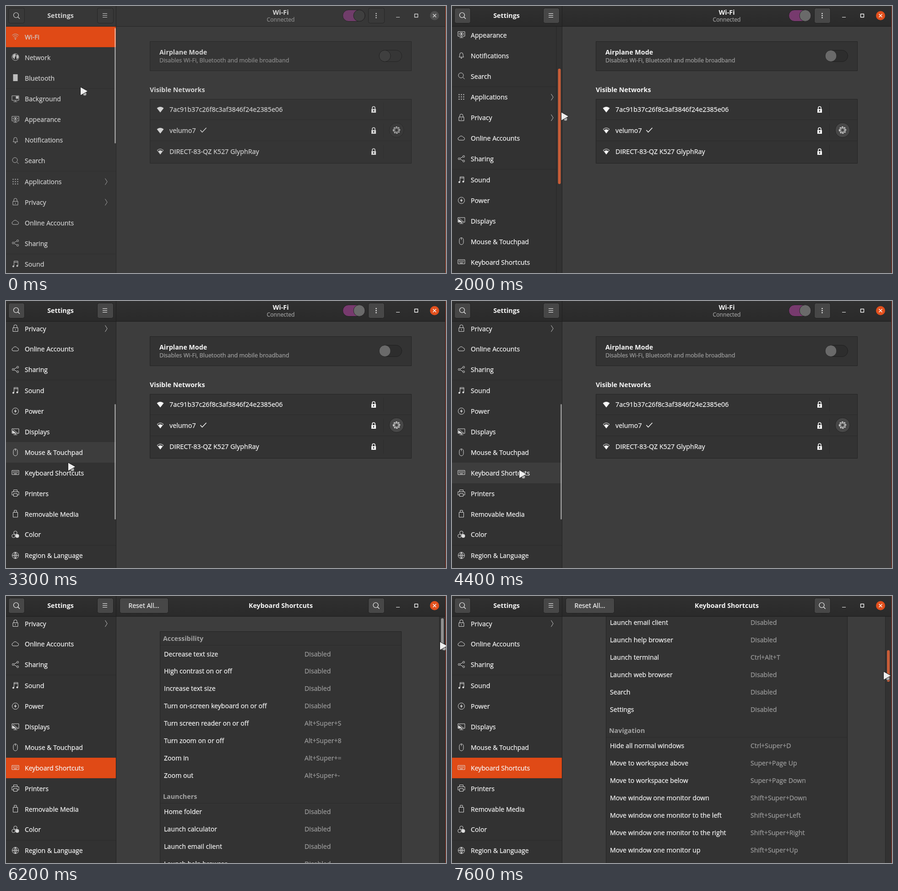
An HTML page with a canvas for the animation above (8000 ms loop, 961x583 px).

```html
<!DOCTYPE html>
<html lang="en">
<head>
<meta charset="utf-8">
<title>Settings</title>
<style>
html, body { margin: 0; width: 100%; height: 100%; overflow: hidden; background: #3c3c3c; }
canvas { display: block; }
</style>
</head>
<body>
<canvas id="stage" width="961" height="583"></canvas>
<script>
const ctx = document.getElementById('stage').getContext('2d');
const FONT = '"Open Sans", "Noto Sans", sans-serif';
const ORANGE = '#e04a16', SLIDER = '#c85d38', IDLE_SLIDER = 'rgba(255, 255, 255, .46)';

const circle = (x, y, r) => `M${x - r} ${y}a${r} ${r} 0 1 0 ${2 * r} 0a${r} ${r} 0 1 0 ${-2 * r} 0`;
const dots = [-5, 0, 5].flatMap(y => [-5, 0, 5].map(x => `M${x - 1} ${y - 1}h2v2h-2z`)).join('');

// label, stroked path, filled path
const ITEMS = [
  ['Wi-Fi', 'M-7-2.5Q0-8.5 7-2.5M-5 .5Q0-4 5 .5M-2.8 3.2Q0 .8 2.8 3.2', circle(0, 5.5, 1.3)],
  ['Network', circle(0, 0, 7.5), 'M-5-5L0-7 1-3-1 0-2 5-6 0zM2-5L6-4 7 1 3 5 2 0z'],
  ['Bluetooth', '', 'M-5-7.5H5V7.5H-5z'],
  ['Background', 'M-7.5-6.5H7.5V3.5H-7.5zM0 3.5V6.5M-4 6.5H4', 'M1-5.5H6.5V0H1z'],
  ['Appearance', 'M-7.5-6.5H7.5V3.5H-7.5zM0 3.5V6.5M-4 6.5H4M-5.5-1.5Q0-7 5.5-1.5Q0 4-5.5-1.5z', circle(0, -1.5, 1.8)],
  ['Notifications', 'M-5 4H5Q3.5 2.5 3.5-2A3.5 3.5 0 0 0-3.5-2Q-3.5 2.5-5 4z', 'M-1.5 5.5h3v1.5h-3z'],
  ['Search', circle(-1, -1, 5.5) + 'M3 3L7 7', ''],
  ['Applications', '', dots],
  ['Privacy', 'M-5.5-1H5.5V7H-5.5zM-3.5-1V-4A3.5 3.5 0 0 1 3.5-4V-1M0 2V4.5', ''],
  ['Online Accounts', 'M-4.5 4.5A3.2 3.2 0 0 1-5-1.8A5 5 0 0 1 4-2A3.3 3.3 0 0 1 4.5 4.5z', ''],
  ['Sharing', 'M-3-1L3-4M-3 1L3 4' + circle(-5, 0, 2) + circle(5, -5, 2) + circle(5, 5, 2), ''],
  ['Sound', 'M-3 5V-6.5H5.5V4M-3-4H5.5', circle(-4.5, 5, 2) + circle(4, 4, 2)],
  ['Power', circle(0, 0, 7), 'M1-5L-3 1H0L-1 5 3-1H0z'],
  ['Displays', 'M-7.5-6.5H7.5V3.5H-7.5zM0 3.5V6.5M-4 6.5H4M-5-5L5 3', 'M-6.5-3L2 3H-6.5z'],
  ['Mouse & Touchpad', 'M-4.5-3A4.5 4.5 0 0 1 4.5-3V3A4.5 4.5 0 0 1-4.5 3zM0-7.5V-3', ''],
  ['Keyboard Shortcuts', 'M-7.5-4.5H7.5V4.5H-7.5z', [-5, -2.2, .6, 3.4].map(x => `M${x}-2.5h1.5v1.5h-1.5zM${x} 0h1.5v1.2h-1.5z`).join('') + 'M-3 2.2H3V3.3H-3z'],
  ['Printers', 'M-4-3V-7H4V-3M-4 4H-7.5V-3H7.5V4H4M-4 1H4V7H-4z', ''],
  ['Removable Media', 'M-5-3H5V7.5H-5zM-2.5-3V-7.5H2.5V-3', ''],
  ['Color', circle(0, -3.5, 3.7) + circle(-4, 3.5, 3.7), circle(4, 3.5, 4)],
  ['Region & Language', circle(0, 0, 7) + 'M0-7Q-6 0 0 7Q6 0 0-7M-7 0H7M0-7V7', '']
];
const BREAKS = [3, 7, 11, 19];
const rowTop = i => 45 + 44.9 * i + .9 * BREAKS.filter(b => b <= i).length;

const off = names => names.map(n => [n, 'Disabled']);
const SECTIONS = [
  ['Accessibility', [
    ...off(['Decrease text size', 'High contrast on or off', 'Increase text size', 'Turn on-screen keyboard on or off']),
    ['Turn screen reader on or off', 'Alt+Super+S'], ['Turn zoom on or off', 'Alt+Super+8'],
    ['Zoom in', 'Alt+Super+='], ['Zoom out', 'Alt+Super+-']]],
  ['Launchers', [
    ...off(['Home folder', 'Launch calculator', 'Launch email client', 'Launch help browser']),
    ['Launch terminal', 'Ctrl+Alt+T'], ...off(['Launch web browser', 'Search', 'Settings'])]],
  ['Navigation', [
    ['Hide all normal windows', 'Ctrl+Super+D'], ['Move to workspace above', 'Super+Page Up'],
    ['Move to workspace below', 'Super+Page Down'], ['Move window one monitor down', 'Shift+Super+Down'],
    ['Move window one monitor to the left', 'Shift+Super+Left'],
    ['Move window one monitor to the right', 'Shift+Super+Right'],
    ['Move window one monitor up', 'Shift+Super+Up']]]
];

// time, cursor x, cursor y
const PATH = [
  [0, 162, 177], [100, 187, 161], [200, 212, 146], [500, 236, 139], [800, 235, 140], [900, 236, 139],
  [2600, 238, 318], [3300, 135, 353], [3400, 133, 360], [3500, 133, 364], [4400, 146, 369],
  [4800, 210, 362], [4900, 270, 340], [5100, 442, 237], [5600, 700, 180], [5700, 926, 123],
  [5900, 946, 144], [6100, 947, 120], [6200, 947, 100], [6600, 947, 119], [6800, 947, 138],
  [7000, 946, 148], [7300, 944, 157], [7400, 943, 161], [7600, 942, 165]
];
// time, cursor x, cursor y, sidebar scroll
const DRAG = [[1000, 236, 139, 0], [1500, 238, 185, 72], [2000, 238, 232, 184.4], [2600, 238, 318, 368.2]];
// time, page scroll
const PAGE = [[0, 0], [6600, 130], [6800, 279], [7000, 355], [7300, 420], [7400, 455], [7600, 489]];

const hold = (keys, t) => keys.filter(k => k[0] <= t).pop().slice(1);
function glide(keys, t) {
  const last = keys[keys.length - 1];
  if (t >= last[0]) return last.slice(1);
  const i = Math.max(1, keys.findIndex(k => k[0] > t));
  const a = keys[i - 1], b = keys[i];
  const p = Math.max(0, (t - a[0]) / (b[0] - a[0]));
  return a.map((v, n) => v + (b[n] - v) * p).slice(1);
}
function mix(a, b, p) {
  const part = (s, n) => parseInt(s.slice(1 + 2 * n, 3 + 2 * n), 16);
  return `rgb(${[0, 1, 2].map(n => Math.round(part(a, n) + (part(b, n) - part(a, n)) * p))})`;
}

let focus = 0;
const tone = (idle, active) => mix(idle, active, focus);

function rect(x, y, w, h, fill) {
  ctx.fillStyle = fill;
  ctx.fillRect(x, y, w, h);
}
function box(x, y, w, h, r, fill, line) {
  ctx.beginPath();
  ctx.roundRect(x + .5, y + .5, w - 1, h - 1, r);
  ctx.fillStyle = fill;
  ctx.fill();
  if (!line) return;
  ctx.lineWidth = 1;
  ctx.strokeStyle = line;
  ctx.stroke();
}
function disc(x, y, r, fill, line) {
  box(x - r, y - r, 2 * r, 2 * r, r, fill, line);
}
function text(s, x, mid, color, size = 14.15, weight = 400, align = 'left') {
  const y = Math.round(mid + size * .357);
  ctx.font = `${weight} ${size}px ${FONT}`;
  ctx.textAlign = align;
  ctx.fillStyle = ctx.strokeStyle = color;
  ctx.fillText(s, x, y);
  if (weight > 400) return;
  ctx.lineWidth = .25; // slightly sturdier strokes
  ctx.strokeText(s, x, y);
}
const bold = (s, x, mid, color, align) => text(s, x, mid, color, 14.3, 700, align);
function icon(x, y, color, stroke, fill, width = 1) {
  ctx.save();
  ctx.translate(x, y);
  ctx.strokeStyle = ctx.fillStyle = color;
  ctx.lineWidth = width;
  if (stroke) ctx.stroke(new Path2D(stroke));
  if (fill) ctx.fill(new Path2D(fill));
  ctx.restore();
}
function clip(x, y, w, h, draw) {
  ctx.save();
  ctx.beginPath();
  ctx.rect(x, y, w, h);
  ctx.clip();
  draw();
  ctx.restore();
}
function scrollbar(edge, top, length, wide, color) {
  if (wide) {
    rect(edge - 12, 45, 12, 538, tone('#353535', '#323232'));
    rect(edge - 13, 45, 1, 538, tone('#303030', '#272727'));
    box(edge - 9.5, top, 7, length, 3.5, color);
  } else {
    box(edge - 4, top, 4, length, 1.5, color);
  }
}

const ink = () => tone('#d2d2d2', '#f7f7f7');
const panel = () => tone('#353535', '#333333');
const border = () => tone('#292929', '#242424');

function button(x, w) {
  box(x, 4, w, 34, 4, tone('#393939', '#474747'), tone('#262626', '#202020'));
}
const searchIcon = x => icon(x, 21, ink(), circle(-1, -1, 5.5) + 'M3 3L7 7', '', 1.2);

function toggle(x, y, on) {
  box(x, y, 50, 26, 13, on ? tone('#703d6a', '#773a6e') : tone('#363636', '#2d2d2d'), tone('#252525', '#1f1f1f'));
  disc(on ? x + 36.5 : x + 12.5, y + 13, 13, tone('#3f3f3f', '#6a6a6a'), tone('#222222', '#2a2a2a'));
}

function header(onKeys) {
  const shade = ctx.createLinearGradient(0, 0, 0, 44);
  shade.addColorStop(0, tone('#373737', '#303030'));
  shade.addColorStop(1, tone('#373737', '#2a2a2a'));
  rect(0, 0, 961, 45, shade);
  rect(0, 44, 961, 1, tone('#262626', '#1c1c1c'));
  rect(240, 0, 1, 45, tone('#262626', '#1f1f1f'));
  button(5, 36);
  searchIcon(23);
  button(199, 36);
  icon(216, 21, ink(), 'M-5-4.5H5M-5-.5H5M-5 3.5H5');
  bold('Settings', 119, 21, ink(), 'center');
  button(791, 36);
  if (onKeys) {
    button(248, 107);
    text('Reset All…', 301, 21, ink(), 14.15, 400, 'center');
    bold('Keyboard Shortcuts', 600, 21, ink(), 'center');
    searchIcon(808.5);
  } else {
    bold('Wi-Fi', 600, 14, ink(), 'center');
    text('Connected', 600, 29.5, tone('#8c8c8c', '#a0a0a0'), 12.1, 400, 'center');
    toggle(735, 8, true);
    icon(808.5, 21, ink(), '', circle(0, -4.5, 1.3) + circle(0, 0, 1.3) + circle(0, 4.5, 1.3));
  }
  rect(852, 24, 8, 1, ink());
  icon(896, 21, ink(), 'M-3.5-3.5h7v7h-7z', '', 1.4);
  disc(936, 21, 10.5, tone('#505050', '#e2501d'));
  icon(936, 21, ink(), 'M-3.5-3.5L3.5 3.5M3.5-3.5L-3.5 3.5', '', 1.5);
}

function sidebar(t, scroll, cursor) {
  rect(0, 45, 240, 538, tone('#353535', '#323232'));
  const chosen = t < 4600 ? 0 : 15;
  const glow = t < 4600 ? 1 : t < 4800 ? .6 : t < 4900 ? .85 : 1;
  ITEMS.forEach(([label, stroke, fill], i) => {
    const y = rowTop(i) - scroll;
    if (y < 0 || y > 583) return;
    const hover = t >= 3300 && cursor[0] < 228 && cursor[1] >= y && cursor[1] < y + 45;
    if (BREAKS.includes(i)) rect(0, Math.round(y) - 1, 240, 1, tone('#2f2f2f', '#2b2b2b'));
    if (i === chosen) box(0, Math.round(y), 240, 45, 0, mix('#3d3d3d', ORANGE, glow), mix('#3d3d3d', '#cf4414', glow));
    else if (hover) rect(0, Math.round(y), 240, 45, '#3d3d3d');
    const mid = y + 22.4;
    icon(20.5, Math.round(mid) - .5, tone('#bdbdbd', '#dedede'), stroke, fill);
    text(label, 41, mid + .3, ink());
    if (i === 7 || i === 8) icon(219, mid, tone('#a8a8a8', '#c8c8c8'), 'M-2.5-7L2 0-2.5 7');
  });
  const dragged = t >= 1100 && t < 3300;
  if (t < 5100) scrollbar(240.5, 47.5 + scroll / 2.08, 253, t >= 500 && t < 3300, dragged ? SLIDER : IDLE_SLIDER);
  rect(240, 45, 1, 538, tone('#282828', '#222222'));
}

function wifiPage(t) {
  box(314, 77, 572, 65, 0, panel(), border());
  bold('Airplane Mode', 335, 100.5, ink());
  text('Disables Wi-Fi, Bluetooth and mobile broadband', 335, 119, tone('#8c8c8c', '#a0a0a0'), 12.6);
  toggle(815, 96, false);
  bold('Visible Networks', 314, 182.5, ink());
  box(314, 203, 572, 141, 0, panel(), border());
  ['7ac91b37c26f8c3af3846f24e2385e06', 'velumo7', 'DIRECT-83-QZ K527 GlyphRay'].forEach((name, i) => {
    const y = 226 + 46 * i;
    const weak = i === 2 || (i === 1 && t >= 500);
    if (i) rect(315, y - 24, 570, 1, tone('#2e2e2e', '#2a2a2a'));
    icon(337, y, ink(), weak ? 'M-6.8-3Q0-8.5 6.8-3L0 5.5z' : '', weak ? 'M-4.5-1Q0-4.5 4.5-1L0 6z' : 'M-7.5-3Q0-9 7.5-3L0 6.5z');
    text(name, 357, y, ink(), 14.3);
    icon(803, y, ink(), 'M-3-1V-3.5A3 3 0 0 1 3-3.5V-1', 'M-5-1H5V7H-5zM-1 1V4.5H1V1z', 1.6);
    rect(824, y - 15, 1, 30, tone('#303030', '#2c2c2c'));
  });
  icon(431, 271, ink(), 'M-6.5 0L-2.5 4.5 6.5-5', '', 1.5);
  disc(853, 271, 16.5, tone('#393939', '#474747'), tone('#2b2b2b', '#252525'));
  icon(853, 271, ink(), circle(0, 0, 6.2) + circle(0, 0, 4.2));
  ctx.setLineDash([2.6, 2.9]);
  icon(853, 271, ink(), circle(0, 0, 7.3), '', 1.3);
  ctx.setLineDash([]);
}

function keysPage(t, scroll, cursor) {
  box(336, 77 - scroll, 528, 1400, 0, '#333333', '#242424');
  let top = 77 - scroll;
  for (const [title, rows] of SECTIONS) {
    bold(title, 343, top + 16, '#a3a3a3');
    rect(337, Math.round(top + 30), 526, 1, '#2b2b2b');
    rows.forEach(([name, keys], i) => {
      const mid = top + 49.5 + 37.9 * i;
      const hover = cursor[0] > 336 && cursor[0] < 864 && Math.abs(cursor[1] - mid) < 19;
      if (hover) rect(337, Math.round(mid - 19), 526, 38, '#3d3d3d');
      text(name, 345, mid, ink());
      text(keys, 652, mid, '#9d9d9d');
    });
    top += 41.6 + 37.9 * rows.length;
  }
  if (t >= 5100) scrollbar(959, 48 + scroll / 7, 70, t >= 6100, t >= 6400 ? SLIDER : IDLE_SLIDER);
}

function pointer([x, y]) {
  ctx.lineJoin = 'round';
  icon(x + 10, y + 15, '#b0b0b0', '', circle(0, 0, 4));
  icon(x + 10, y + 15, '#3a3a3a', circle(0, 0, 4), '', .8);
  const arrow = 'M1 .5L16 9 1 17.5z';
  icon(x, y, '#202020', arrow, '', 2);
  icon(x, y, '#eeeeee', '', arrow);
}

function draw(t) {
  focus = Math.min(1, Math.max(0, (t - 1000) / 300));
  const [dragX, dragY, sideScroll] = glide(DRAG, t);
  const cursor = t >= 1100 && t < 2600 ? [dragX, dragY] : hold(PATH, t);
  const onKeys = t >= 4600;
  rect(0, 0, 961, 583, tone('#3c3c3c', '#3d3d3d'));
  clip(241, 45, 720, 538, () => onKeys ? keysPage(t, hold(PAGE, t)[0], cursor) : wifiPage(t));
  clip(0, 45, 241, 538, () => sidebar(t, sideScroll, cursor));
  header(onKeys);
  rect(959, 0, 1, 583, tone('#303030', '#292929'));
  rect(960, 0, 1, 583, tone('#cf5236', '#a53a28'));
  pointer(cursor);
}

function loop() {
  draw(Math.floor(performance.now() % 8000 / 100) * 100);
  requestAnimationFrame(loop);
}
loop();
</script>
</body>
</html>
```
